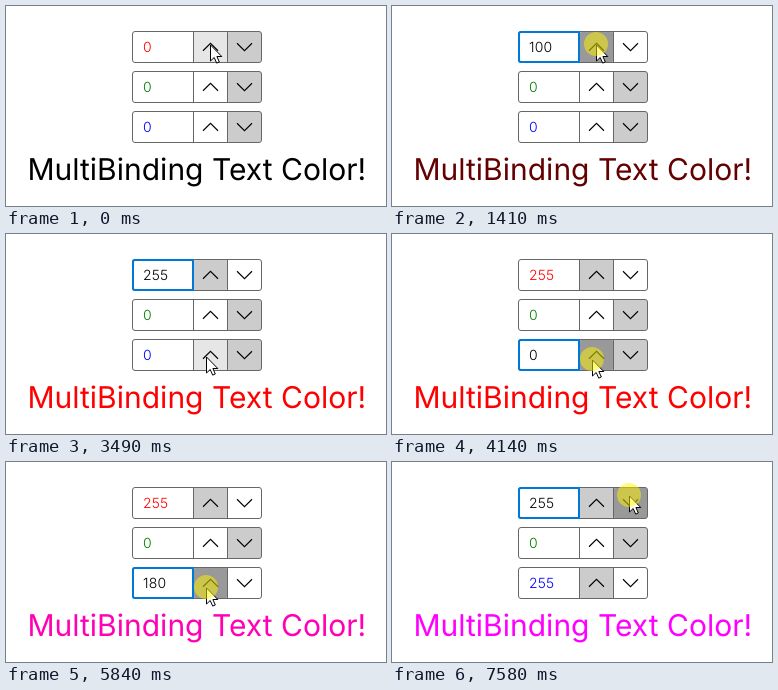
These frames come from a looping animation (380 by 200 pixels, 7.99 s). An HTML page:

```html
<!DOCTYPE html>
<html lang="en">
<head>
<meta charset="utf-8">
<title>Text color binding</title>
<style>
  html, body { margin: 0; width: 100%; height: 100%; overflow: hidden; background: #fff; }
  svg { display: block; }
  text {
    font-family: Inter, "Open Sans", sans-serif;
    font-optical-sizing: none;
    text-rendering: geometricPrecision;
  }
  .value { font-size: 14px; font-weight: 300; letter-spacing: .2px; }
  .title { font-size: 30px; font-weight: 400; }
  .line { fill: none; stroke: #666; }
  .chevron { fill: none; stroke: #000; stroke-width: 1.1; }
  .focus { fill: none; stroke: #0078d7; stroke-width: 2; }
</style>
</head>
<body>
<svg width="380" height="200" viewBox="0 0 380 200">
  <g id="rows"></g>
  <text id="title" class="title" x="21.5" y="174">MultiBinding Text Color!</text>
  <g id="pointer">
    <path d="M.5 1V17L4.2 13.5L6.7 19.1L9.3 18L6.9 12.5H11.8Z" fill="#fff" stroke="#000"/>
    <circle id="halo" r="12" fill="#fff500" fill-opacity=".5"/>
  </g>
</svg>
<script>
const LOOP = 7990;
const $ = id => document.getElementById(id);

const INKS = ["#f00", "#008000", "#00f"];
const BUTTONS = [{ name: "up", x: 188, dir: 1 }, { name: "down", x: 222, dir: -1 }];

// each press focuses its row
const PRESSES = [
  { row: 0, from: 290, to: 3060 },
  { row: 2, from: 4100, to: 6960 },
  { row: 0, from: 7530, to: LOOP }
];

const easeOut = p => Math.sin(p * Math.PI / 2);
const easeInOut = p => (1 - Math.cos(p * Math.PI)) / 2;
const HOME = [204, 38];
const GLIDES = [
  { from: 3190, to: 3600, end: [200, 130], ease: easeOut },
  { from: 3860, to: 4000, end: [200, 125], ease: easeInOut },
  { from: 6960, to: 7370, end: [237, 33], ease: easeInOut }
];

function pointerAt(t) {
  let pos = HOME;
  for (const { from, to, end, ease } of GLIDES) {
    const p = ease(Math.min(1, Math.max(0, (t - from) / (to - from))));
    pos = pos.map((v, i) => v + (end[i] - v) * p);
  }
  return pos.map(Math.round);
}

// a held button adds 20 at a steady rate, up to 255
const count = (t, first, every) =>
  t < first ? 0 : Math.min(255, 20 * (1 + Math.floor((t - first) / every)));

function rowMarkup(i) {
  const y = 25 + 40 * i, mid = y + 16;
  const button = ({ name, x, dir }) => `
    <rect id="${name}${i}" x="${x}" y="${y + 1}" width="33" height="30" rx="1"/>
    <path class="chevron" d="M${x + 9} ${mid + 3.75 * dir}l7.5 ${-7.5 * dir}l7.5 ${7.5 * dir}"/>`;
  return `${BUTTONS.map(button).join("")}
    <rect class="line" x="126.5" y="${y + .5}" width="129" height="31" rx="2.5"/>
    <path class="line" d="M187.5 ${y}v32M221.5 ${y}v32"/>
    <path id="focus${i}" class="focus" d="M187 ${y + 1}v30h-58q-2 0 -2 -2v-26q0 -2 2 -2z"/>
    <text id="value${i}" class="value" x="137" y="${y + 21}"></text>`;
}

function draw(t) {
  const [x, y] = pointerAt(t);
  const press = PRESSES.filter(p => t >= p.from).pop();
  const pressed = press && t < press.to;
  const values = [count(t, 740, 154), 0, count(t, 4550, 159)];

  values.forEach((value, i) => {
    const top = 25 + 40 * i;
    const focused = press && press.row === i;
    for (const { name, x: left } of BUTTONS) {
      const disabled = value === (name === "up" ? 255 : 0);
      const over = x >= left && x < left + 33 && y > top && y < top + 31;
      $(name + i).setAttribute("fill",
        disabled ? "#ccc" : over ? (pressed ? "#999" : "#e6e6e6") : "#fff");
    }
    $("value" + i).textContent = value;
    $("value" + i).setAttribute("fill", focused ? "#000" : INKS[i]);
    $("focus" + i).setAttribute("visibility", focused ? "visible" : "hidden");
  });

  $("title").setAttribute("fill", `rgb(${values.join()})`);
  $("halo").setAttribute("visibility", pressed ? "visible" : "hidden");
  $("pointer").setAttribute("transform", `translate(${x} ${y})`);
}

$("rows").innerHTML = [0, 1, 2].map(rowMarkup).join("");
const start = performance.now();
function tick() {
  draw((performance.now() - start) % LOOP);
  requestAnimationFrame(tick);
}
draw(0);
requestAnimationFrame(tick);
</script>
</body>
</html>
```
